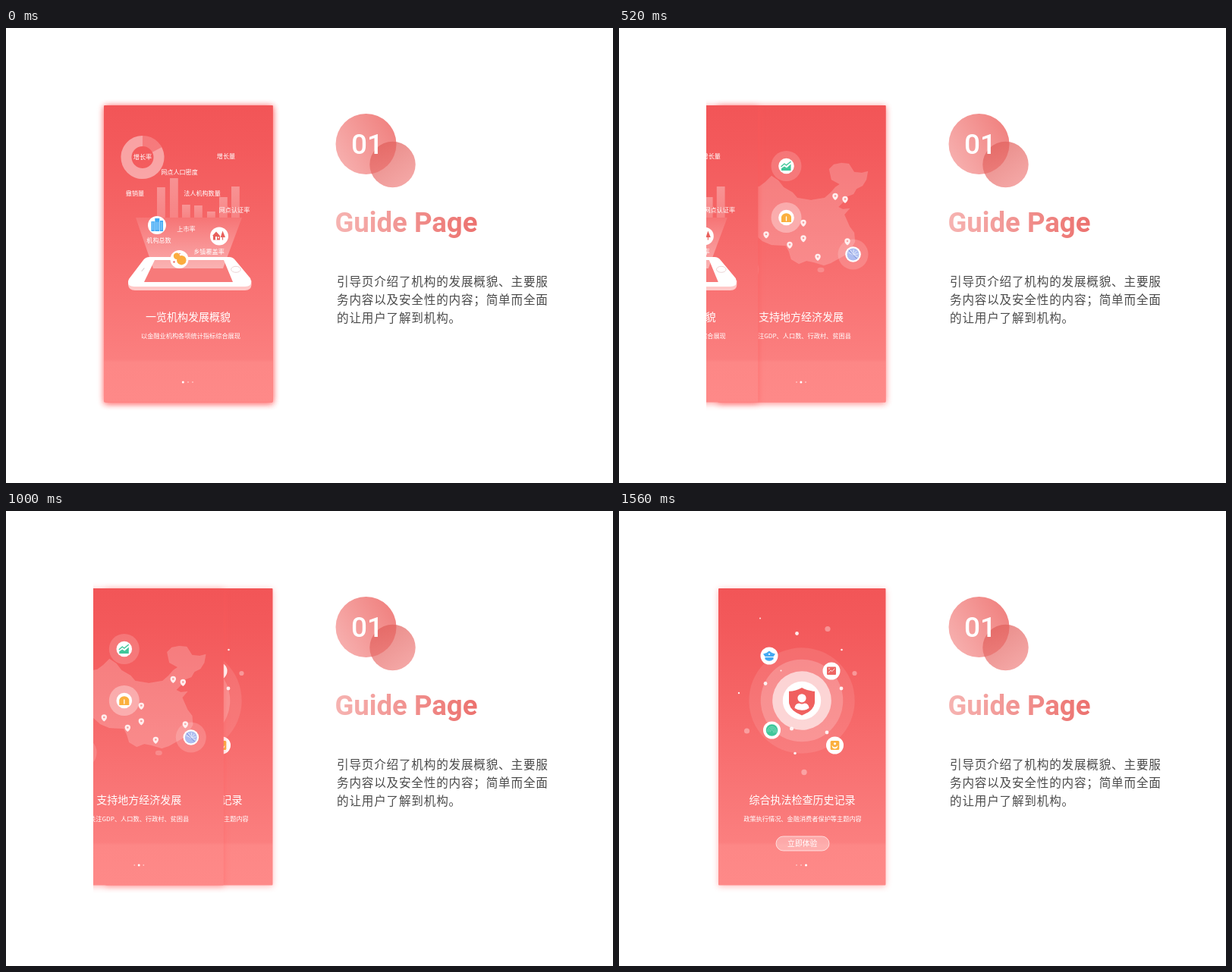
An HTML page that plays this animation: 800 px wide and 600 px high, repeating every 2.08 s.

```html
<!DOCTYPE html>
<html lang="zh-CN">
<head>
<meta charset="utf-8">
<title>Guide Page</title>
<style>
html, body { margin: 0; width: 100%; height: 100%; overflow: hidden; background: #fff; }
svg { display: block; width: 800px; height: 600px; }
text { font-family: "Noto Sans CJK SC", "Noto Sans CJK", "Noto Sans", sans-serif; }
.latin { font-family: Roboto, Inter, sans-serif; }
</style>
</head>
<body>
<svg id="stage" viewBox="0 0 800 600">
  <defs>
    <linearGradient id="card" x1="0" y1="0" x2="0" y2="1">
      <stop offset="0" stop-color="#f25557"/>
      <stop offset=".13" stop-color="#f3595b"/>
      <stop offset=".36" stop-color="#f56465"/>
      <stop offset=".6" stop-color="#f87172"/>
      <stop offset=".855" stop-color="#fb7f7f"/>
      <stop offset=".865" stop-color="#fd8786"/>
      <stop offset="1" stop-color="#fe8988"/>
    </linearGradient>
    <linearGradient id="beam" x1="0" y1="0" x2="0" y2="1">
      <stop offset="0" stop-color="#fff" stop-opacity=".1"/>
      <stop offset="1" stop-color="#fff" stop-opacity=".42"/>
    </linearGradient>
    <linearGradient id="bar" x1="0" y1="0" x2="0" y2="1">
      <stop offset="0" stop-color="#fff" stop-opacity=".32"/>
      <stop offset="1" stop-color="#fff" stop-opacity=".2"/>
    </linearGradient>
    <linearGradient id="big" x1="0" y1=".8" x2="1" y2=".2">
      <stop offset="0" stop-color="#f7b1b0"/>
      <stop offset="1" stop-color="#f0807e"/>
    </linearGradient>
    <linearGradient id="small" x1=".1" y1="0" x2=".8" y2="1">
      <stop offset="0" stop-color="#de5a56" stop-opacity=".72"/>
      <stop offset="1" stop-color="#f0807e" stop-opacity=".68"/>
    </linearGradient>
    <linearGradient id="head" gradientUnits="userSpaceOnUse" x1="435" y1="0" x2="621" y2="0">
      <stop offset="0" stop-color="#f6b3b1"/>
      <stop offset="1" stop-color="#ec716e"/>
    </linearGradient>
    <filter id="blur" x="-20%" y="-20%" width="140%" height="140%"><feGaussianBlur stdDeviation="4"/></filter>
    <clipPath id="view"><rect x="115" y="0" width="285" height="600"/></clipPath>
  </defs>
  <rect width="800" height="600" fill="#fff"/>
  <g clip-path="url(#view)">
    <g id="page3"></g>
    <g id="page2"></g>
    <g id="page1"></g>
  </g>
  <g id="info"></g>
</svg>
<script>
const el = id => document.getElementById(id);
const circle = (x, y, r, fill = '#fff', op = 1) =>
  `<circle cx="${x}" cy="${y}" r="${r}" fill="${fill}" fill-opacity="${op}"/>`;
const rect = (x, y, w, h, fill, rx = 0) =>
  `<rect x="${x}" y="${y}" width="${w}" height="${h}" rx="${rx}" fill="${fill}"/>`;
const path = (d, fill, more = '') => `<path d="${d}" fill="${fill}" ${more}/>`;
const line = (d, color, w = 1) =>
  path(d, 'none', `stroke="${color}" stroke-width="${w}" stroke-linecap="round" stroke-linejoin="round"`);
const label = (str, x, y, size, fill = '#fff') =>
  `<text x="${x}" y="${y + size * 0.37}" font-size="${size}" fill="${fill}" text-anchor="middle">${str}</text>`;

const TOP = 102, BOTTOM = 493.5, RIGHT = 351.5;

function page(left, shade, title, sub, active, art) {
  const w = RIGHT - left, h = BOTTOM - TOP;
  const dots = [0, 1, 2].map(i => i === active
    ? circle(233.3 + i * 6.6, 467, 1.5)
    : circle(234 + i * 6, 467, 0.9, '#fff', 0.5)).join('');
  return `<rect x="${left}" y="${TOP + 1.5}" width="${w}" height="${h}" fill="#ff5a5a" opacity="${shade}" filter="url(#blur)"/>`
    + rect(left, TOP, w, h, 'url(#card)', 1) + art
    + label(title, title.length > 8 ? 241.5 : 240, 380.5, 14)
    + label(sub, sub.length > 18 ? 242 : sub[0] === '以' ? 243.5 : 240.3, 405.5, 8.2) + dots;
}

function phoneArt() {
  const bars = [[199, 210], [216, 198], [232, 233], [248, 234], [265, 242], [281, 223], [297, 209]]
    .map(([x, y]) => rect(x, y, 10.8, 250 - y, 'url(#bar)')).join('');
  const names = [['增长率', 180, 170], ['增长量', 290, 169], ['网点人口密度', 228.5, 190.5],
    ['撤销量', 170, 218.5], ['法人机构数量', 258.5, 218], ['网点认证率', 301, 240.5],
    ['上市率', 237.5, 265], ['机构总数', 201.5, 280], ['乡镇覆盖率', 267.5, 295]]
    .map(([s, x, y]) => label(s, x, y, 8.1)).join('');
  const ring = `<circle cx="180" cy="170.5" r="21.5" fill="none" stroke="#fff" stroke-width="14" stroke-opacity=".2"/>`
    + `<path d="M199 160.5A21.5 21.5 0 1 1 180 149" fill="none" stroke="#fff" stroke-width="14" stroke-opacity=".3"/>`;
  const phone = path('M161 333V339Q162 346 170 346H315Q323 346 323.5 339V333Z', '#ffc9c8')
    + path('M189 302H294Q299 302 302 306L322 330Q326 341 315 341H169Q158 341 162 331L181 306Q184 302 189 302Z', '#fff')
    + path('M196 306H287L299 335H182Z', '#f77a7a')
    + `<ellipse cx="303" cy="318.3" rx="6.3" ry="4" fill="#fff" stroke="#e6c9cb" stroke-width=".8"/>`
    + line('M179 320.5L182 316.8', '#dccdd0', 1.1);
  const beam = path('M171 250H311L286 317H194Z', 'url(#beam)');
  const office = circle(199, 260, 12) + rect(191.5, 255, 4.2, 13, '#3fa9f5') + rect(196.3, 251, 6, 17, '#3fa9f5')
    + rect(203, 254, 4, 14, '#3fa9f5')
    + [193.6, 198.2, 200.4, 205].map(x => line(`M${x} 256V266`, '#fff', 0.5)).join('');
  const homes = circle(281, 274.5, 12)
    + path('M272 274L277 268.5L282 274V279.5H273V274Z', '#e8605c') + rect(276, 275, 2, 4.5, '#fff')
    + path('M285.5 267.5L289 276H282.7Z', '#e8605c') + rect(285, 275, 1.1, 4.5, '#e8605c')
    + rect(279, 275.5, 1.8, 1.8, '#fff');
  const coins = circle(228.5, 305, 12) + circle(225, 300.8, 4.2, '#fbac3f') + circle(231.3, 306.2, 6.2, '#fbac3f')
    + circle(221.5, 308.5, 1.2, '#ef6a66') + circle(229, 297.5, 0.8, '#ef6a66');
  return ring + bars + phone + beam + office + homes + coins + names;
}

function mapArt() {
  const land = path('M151 225L159 220L168 219L173 211L185 209L193 203L201 195L210 201L217 210L229 217L235 224L253 227'
    + 'L271 224L279 217L285 210L291 206L280 200L277 186L283 180L293 178L303 179L310 190L320 191L328 189L326 200'
    + 'L321 208L313 212L309 219L301 222L296 229L289 236L295 239L304 238L297 246L304 262L310 270L311 282L305 292'
    + 'L297 300L279 310L270 313L257 309L247 307L237 311L227 305L224 295L220 287L201 286L189 281L170 264L161 256'
    + 'L159 247L154 236Z', '#fff', 'fill-opacity=".2" stroke="#fff" stroke-opacity=".05" stroke-linejoin="round"')
    + `<ellipse cx="266" cy="319" rx="4.5" ry="3.2" fill="#fff" fill-opacity=".2"/>`;
  const pins = [[285, 222], [298, 226], [243, 257], [243, 277.5], [194, 272.5], [225, 286], [262, 302], [301, 281.5]]
    .map(([x, y]) => path(`M${x} ${y + 5}Q${x - 3.7} ${y + 2} ${x - 3.7} ${y - 0.6}A3.7 3.7 0 0 1 ${x + 3.7} ${y - 0.6}Q${x + 3.7} ${y + 2} ${x} ${y + 5}Z`, '#ffeeee')
      + circle(x, y - 0.5, 1.3, '#f79a99')).join('');
  const badge = (x, y, halo) => circle(x, y, 20, '#fff', halo) + circle(x, y, 10.3);
  const chart = badge(220.5, 182, 0.17)
    + path('M214 188V185L218 182.5L221 184.5L226.5 179.5V188Z', '#3fc79a')
    + line('M214 182.5L218 179L220.5 181L226 176.5', '#3fc79a', 1.4);
  const house = badge(220.5, 250, 0.33)
    + path('M214 249Q215 245 220.5 244.2Q226 245 227 249V256H214Z', '#fbb03f') + line('M220.5 249V254', '#fff', 1.3);
  const fan = badge(308.5, 298.5, 0.17) + circle(308.5, 298.5, 8, '#adbdf0')
    + [0, 1, 2, 3, 4, 5].map(i => {
      const a = i * Math.PI / 5 - 2.7;
      return line(`M308.5 299L${308.5 + 6.5 * Math.cos(a)} ${299 + 6.5 * Math.sin(a)}`, '#fff', 0.7);
    }).join('') + line('M303 293L313 304', '#7f93dd', 1);
  const net = badge(164.3, 318.5, 0.15) + circle(164.6, 319, 2.4, '#ee6a68')
    + [0, 1, 2, 3, 4].map(i => {
      const a = i * Math.PI * 0.4 - 0.8;
      return circle(164.3 + 6 * Math.cos(a), 318.5 + 6 * Math.sin(a), 1.8, '#ee6a68');
    }).join('');
  return land + house + pins + chart + fan + net;
}

function shieldArt() {
  const rings = circle(241, 250, 69.7, '#fff', 0.1) + circle(241, 250, 54.3, '#fff', 0.2)
    + circle(241, 250, 38.8, '#fff', 0.62) + circle(241, 250, 25.2);
  const shield = path('M241 233Q249 237.5 258 237.8V252Q257.5 263 241 269.5Q224.5 263 224 252V237.8Q233 237.5 241 233Z', '#f0605f')
    + circle(241, 246.8, 5.6) + path('M231.5 260Q232 253.8 237.5 253.5Q241 255.3 244.5 253.5Q250 253.8 250.5 260Q246.5 262.8 241 262.8Q235.5 262.8 231.5 260Z', '#fff');
  const specks = [[186, 141.5, 1], [234.5, 161.5, 2.4], [293.5, 183, 1.3], [193, 227.5, 2.4], [213.5, 210.5, 1],
    [293, 234, 2.4], [158, 240, 1.2], [227.5, 287, 2.5], [274, 292, 2.4], [232, 319.5, 1.8]]
    .map(([x, y, r]) => circle(x, y, r, '#fff', 0.88)).join('')
    + [[275, 155.5, 3.6], [310.5, 214, 3.1], [168.5, 290, 3.6], [244, 344.5, 3.7]]
      .map(([x, y, r]) => circle(x, y, r, '#fff', 0.35)).join('');
  const hat = circle(198, 191, 11.5)
    + path('M190 188.5Q195 187.5 198 184.5Q201 187.5 206 188.5L203.5 192H192.5Z', '#45a9f2')
    + path('M192.5 193H203.5V195.5Q198 200 192.5 195.5Z', '#45a9f2') + circle(198, 188.8, 1.1);
  const board = circle(280, 211, 11.5) + rect(274, 205.5, 12, 10.5, '#ee6563', 1)
    + line('M276.5 213L279 210L281 211.5L284 208', '#fff', 0.8) + circle(277, 208, 0.8);
  const print = circle(201.5, 289, 11.5) + circle(201.5, 289, 7.8, '#3fc79a')
    + [2, 4, 6].map(r => line(`M${201.5 - r} 291A${r} ${r} 0 0 1 ${201.5 + r} 290V292`, '#a5e5cf', 0.6)).join('');
  const file = circle(284.5, 309, 11.5) + rect(278.7, 303, 11.6, 12, '#fbb03f', 1.5)
    + circle(284.5, 306.8, 1.6) + path('M280.5 309Q284.5 314 288.5 309Q288 313.5 284.5 313.5Q281 313.5 280.5 309Z', '#fff');
  const button = `<rect x="207" y="429" width="70" height="19" rx="9.5" fill="#fff" fill-opacity=".33" stroke="#fff" stroke-opacity=".65"/>`
    + label('立即体验', 241.7, 438.7, 9.8);
  return rings + shield + specks + hat + board + print + file + button;
}

function infoArt() {
  const lines = ['引导页介绍了机构的发展概貌、主要服', '务内容以及安全性的内容；简单而全面', '的让用户了解到机构。'];
  return circle(474.5, 153, 40, 'url(#big)') + circle(509.5, 180, 30.2, 'url(#small)')
    + '<text class="latin" x="455" y="166" font-size="37" font-weight="500" fill="#fff">01</text>'
    + '<text class="latin" x="433.5" y="268.5" font-size="36.5" font-weight="700" fill="url(#head)">Guide Page</text>'
    + lines.map((s, i) =>
      `<text x="436" y="${339.7 + 24 * i}" font-size="15.6" letter-spacing=".8" fill="#4a4a4a">${s}</text>`).join('');
}

el('page1').innerHTML = page(129, 0.6, '一览机构发展概貌', '以金融业机构各项统计指标综合展现', 0, phoneArt());
el('page2').innerHTML = page(130, 0.45, '支持地方经济发展', '关注GDP、人口数、行政村、贫困县', 1, mapArt());
el('page3').innerHTML = page(131, 0.4, '综合执法检查历史记录', '政策执行情况、金融消费者保护等主题内容', 2, shieldArt());
el('info').innerHTML = infoArt();

const LOOP = 2080, STEP = 40, TURN = 800, GONE = 760, SPEED = 0.3235;

// Each page slides left at constant speed, uncovering the one below.
function slide(id, t) {
  const g = el(id);
  g.setAttribute('transform', `translate(${-SPEED * Math.max(0, t)} 0)`);
  g.setAttribute('visibility', t < GONE ? 'visible' : 'hidden');
}

function draw(ms) {
  const t = Math.floor((ms % LOOP) / STEP) * STEP;
  slide('page1', t);
  slide('page2', t - TURN);
}

const start = performance.now();
function tick() {
  draw(performance.now() - start);
  requestAnimationFrame(tick);
}
draw(0);
requestAnimationFrame(tick);
</script>
</body>
</html>
```
